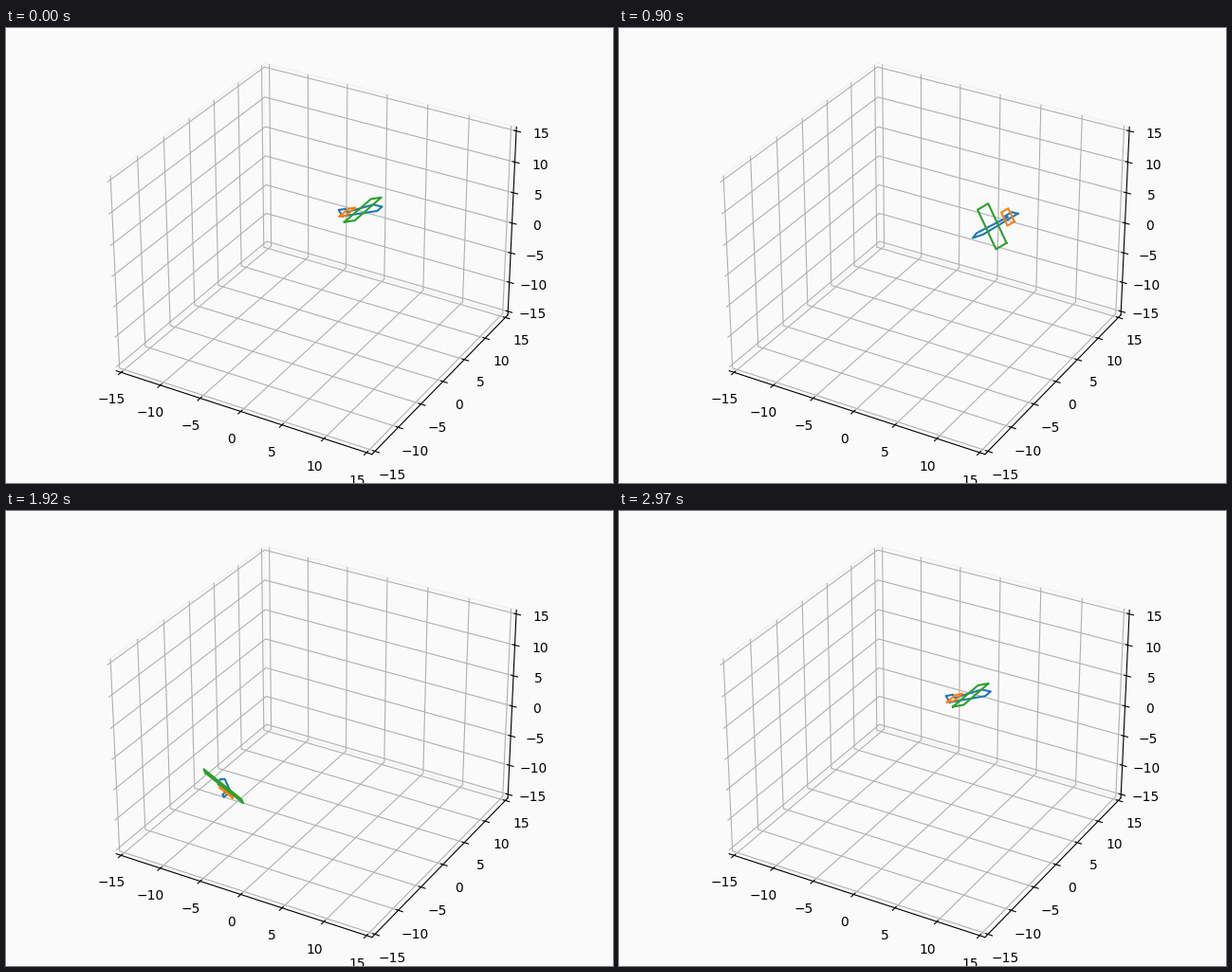
Animation, 640 px wide and 480 px high, one loop 3 s. Source, as a matplotlib script:

```python
import numpy as np
import matplotlib.pyplot as plt
from matplotlib.animation import FuncAnimation

FRAMES = 100
RADIUS = 10
MAX_PITCH = np.pi / 6
BACKGROUND = "#fafafa"

# Outlines in body axes: x forward, y along the wing, z up
FUSELAGE = [(-3, 0, -.5), (2, 0, -.5), (3, 0, 0), (2, 0, .5),
            (-2, 0, 0), (-2, 0, .5), (-3, 0, .5)]


def rect(x0, x1, half):
    return [(x0, -half, 0), (x1, -half, 0), (x1, half, 0), (x0, half, 0)]


def closed(points):
    return np.array(points + points[:1], float).T


PARTS = [closed(p) for p in (FUSELAGE, rect(-2.5, -1.5, 1), rect(-.5, 1, 3))]


def rotation(roll, pitch, yaw):
    cr, sr = np.cos(roll), np.sin(roll)
    cp, sp = np.cos(pitch), np.sin(pitch)
    cy, sy = np.cos(yaw), np.sin(yaw)
    rx = np.array([[1, 0, 0], [0, cr, -sr], [0, sr, cr]])
    ry = np.array([[cp, 0, -sp], [0, 1, 0], [sp, 0, cp]])
    rz = np.array([[cy, -sy, 0], [sy, cy, 0], [0, 0, 1]])
    return rz @ ry @ rx


fig = plt.figure(figsize=(6.4, 4.8), dpi=100, facecolor=BACKGROUND)
ax = fig.add_axes([0, 0, 1, 1], projection="3d", facecolor=BACKGROUND)
limit = 15 * 25 / 24
ax.set(xlim=(-limit, limit), ylim=(-limit, limit), zlim=(-limit, limit))
for axis in (ax.xaxis, ax.yaxis, ax.zaxis):
    axis.set_ticks(range(-15, 16, 5))
    axis.set_pane_color(BACKGROUND)
    axis.pane.set_edgecolor("#f2f2f2")

lines = [ax.plot([], [], [], color=c)[0] for c in ("C0", "C1", "C2")]


def update(i):
    a = 2 * np.pi * i / FRAMES
    rot = rotation(a, MAX_PITCH * np.cos(a), -a)
    pos = RADIUS * np.array([[np.sin(a)], [np.cos(a)], [np.sin(a)]])
    for line, part in zip(lines, PARTS):
        line.set_data_3d(*(rot @ part + pos))
    return lines


anim = FuncAnimation(fig, update, frames=FRAMES, interval=30,
                     repeat=True, repeat_delay=0)
plt.show()
```
